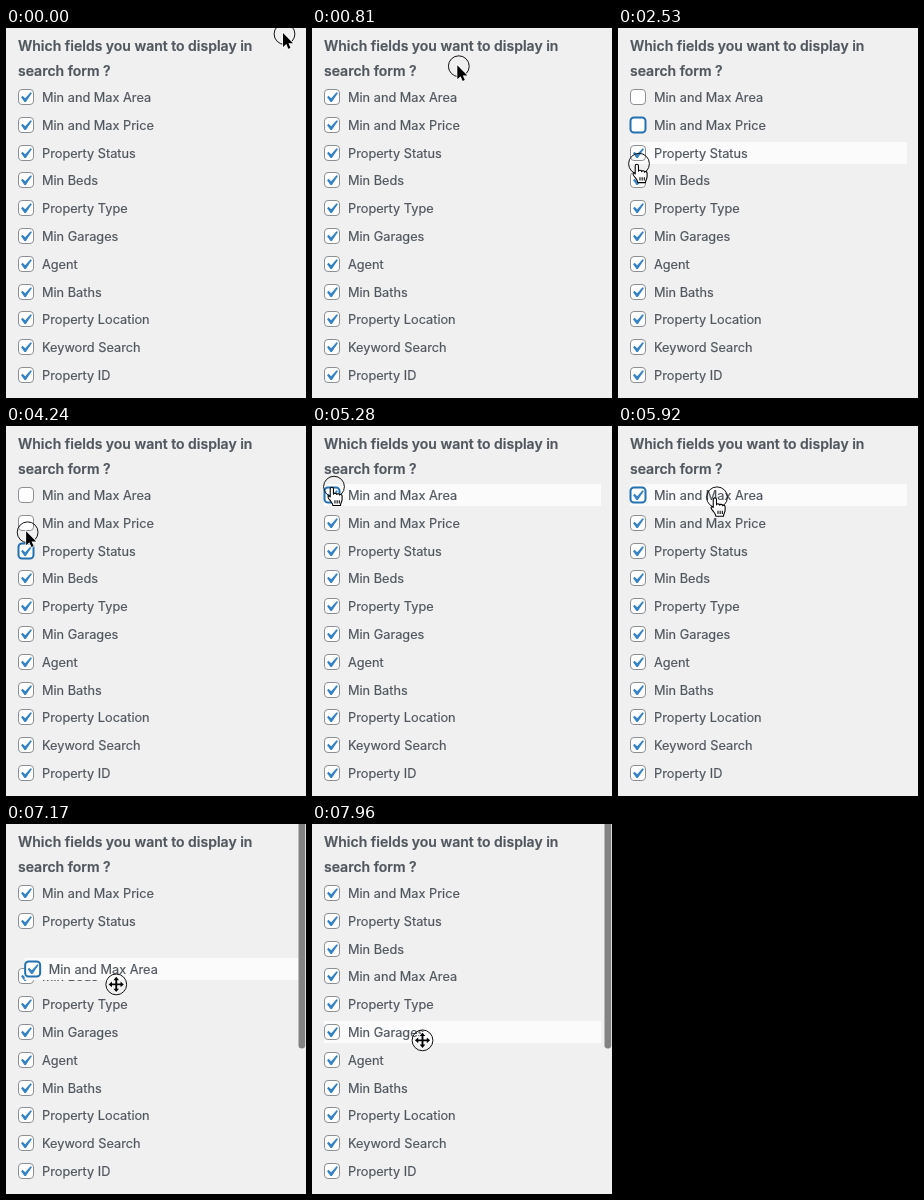
Animation of 300x370 px, one loop 8 s. Source, as an HTML page:

```html
<!DOCTYPE html>
<html lang="en">
<head>
<meta charset="utf-8">
<title>Sortable search fields</title>
<style>
  html, body { margin: 0; width: 100%; height: 100%; overflow: hidden; background: #f0f0f0; }
  svg { display: block; }
  text { font: 12.75px Inter, sans-serif; fill: #50575e; stroke: #50575e; stroke-width: .2; }
  .heading { font-size: 14px; font-weight: 600; }
  .highlight { fill: #fbfbfb; }
  .box { fill: #fff; stroke: #8c8f94; }
  .box.focused { stroke: #2271b1; stroke-width: 2; }
  .tick { fill: #3582c4; }
  .hand { fill: #fff; stroke: #000; stroke-linejoin: round; }
  .arrow, .move { fill: #000; stroke: #fff; stroke-width: 1.4; paint-order: stroke; }
</style>
</head>
<body>
<svg width="300" height="370" viewBox="0 0 300 370">
  <text class="heading" x="12" y="23">Which fields you want to display in</text>
  <text class="heading" x="12" y="48">search form ?</text>
  <g id="rows"></g>
  <rect id="scrollbar" x="292.5" y="-8" width="6.7" height="232.5" rx="3.3" fill="#838383"/>
  <g id="cursor">
    <circle r="10.4" fill="none" stroke="#111"/>
    <path class="arrow" d="M-1.5-1v14l3.3-3 2 4.8 2.2-.9-2-4.7h4.5z"/>
    <path class="hand" transform="scale(1.08)" d="M-3.5 2c0-2 3-2 3 0v5c0-1.3 2.8-1.3 3 .3.3-1.2 2.6-.9 2.7.5.4-1 2.3-.6 2.3 1v3c0 2.5-1.5 3-1.5 5.7h-7c0-2-1.5-3.2-3-5.2-1.2-1.6-2.2-3-1-3.6.8-.4 1.2.3 1.5.8zM.9 12.5v3M2.9 12.5v3M4.9 12.5v3"/>
    <path class="move" transform="scale(.95)" d="M0-8l3 3.5H1V-1h3.5v-2L8 0 4.5 3V1H1v3.5h2L0 8l-3-3.5h2V1h-3.5v2L-8 0l3.5-3v2H-1v-3.5h-2z"/>
  </g>
</svg>
<script>
const LOOP = 8000, DRAG_START = 6430, DROP = 7530;
const DRAG_LAG = 105, HOVER_LAG = 40;
const BOX_X = 21, LABEL_X = 102.5, DROP_X = 111.5;
const labels = ["Min and Max Area", "Min and Max Price", "Property Status", "Min Beds",
  "Property Type", "Min Garages", "Agent", "Min Baths", "Property Location",
  "Keyword Search", "Property ID"];

const rowY = slot => 69 + 27.8 * slot;
const easeOut = u => Math.sin(u * Math.PI / 2);
const easeInOut = u => u * u * (3 - 2 * u);
const linear = u => u;

// Pointer moves: start, end, x, row position, easing
const glides = [
  [410, 1200, BOX_X, 0, easeInOut],
  [1750, 2030, BOX_X, 0.8, easeOut],
  [2260, 2530, BOX_X, 2.4, easeOut],
  [2850, 3210, BOX_X, 1.9, easeOut],
  [3350, 3600, BOX_X, 1.3, easeInOut],
  [3600, 3860, BOX_X, 1.9, easeInOut],
  [4130, 4390, BOX_X + 1, 1, easeOut],
  [4700, 5070, BOX_X + 1, -0.3, easeOut],
  [5300, 6010, LABEL_X, 0.1, easeInOut],
  [DRAG_START, 7290, DROP_X, 3.8, linear],
  [7740, 7960, DROP_X - 1, 5.3, easeOut]];

// Each click toggles the row under the pointer
const clickTimes = [1280, 2260, 3050, 4130, 4650, 5270];

const $ = id => document.getElementById(id);
const show = (el, on) => { el.style.display = on ? "" : "none"; };

$("rows").innerHTML = labels.map(label => `<g>
  <rect class="highlight" x="12" y="-11" width="277" height="22"/>
  <rect class="box" x="12.5" y="-7.5" width="15" height="15" rx="3.5"/>
  <path class="tick" transform="translate(9 -10) scale(1.05)"
    d="M14.83 4.89l1.34.94-5.81 8.38H9.02L5.78 9.67l1.34-1.25 2.57 2.4z"/>
  <text x="36" y="5">${label}</text></g>`).join("");
const rows = [...$("rows").children].map(g => ({
  g, highlight: g.children[0], box: g.children[1], tick: g.children[2] }));
$("rows").append(rows[0].g); // the dragged row stays on top

function pointer(t) {
  let x = 278.5, y = 6;
  for (const [start, end, toX, toRow, ease] of glides) {
    const s = ease(Math.min(1, Math.max(0, (t - start) / (end - start))));
    x += (toX - x) * s;
    y += (rowY(toRow) - y) * s;
  }
  return [x, y];
}

function slotAt([x, y]) {
  const slot = Math.round((y - rowY(0)) / (rowY(1) - rowY(0)));
  return x < 289 && Math.abs(y - rowY(slot)) < 11.2 ? slot : -1;
}

const clickedRows = clickTimes.map(time => slotAt(pointer(time)));

function render(t) {
  const dragging = t >= DRAG_START && t < DROP;
  const [x, y] = pointer(t);
  const hovered = slotAt(pointer(t - HOVER_LAG));

  const grab = pointer(DRAG_START), held = pointer(Math.max(DRAG_START, t - DRAG_LAG));
  const dx = held[0] - grab[0], dy = held[1] - grab[1];
  const gap = t < DRAG_START ? 0 : Math.min(3, Math.floor(dy / (rowY(1) - rowY(0))));

  const clicked = clickedRows.filter((row, i) => t >= clickTimes[i]);
  const focus = t < DROP ? clicked.at(-1) : -1;

  rows.forEach((row, i) => {
    const lifted = dragging && i === 0;
    const slot = i === 0 ? gap : i <= gap ? i - 1 : i;
    const left = lifted ? dx : 0, top = Math.round(lifted ? rowY(0) + dy : rowY(slot));
    row.g.setAttribute("transform", `translate(${left} ${top})`);
    row.box.classList.toggle("focused", focus === i);
    show(row.highlight, dragging ? lifted : slot === hovered);
    show(row.tick, clicked.filter(r => r === i).length % 2 === 0);
  });

  const kind = t >= DRAG_START ? "move" : hovered >= 0 ? "hand" : "arrow";
  for (const shape of $("cursor").querySelectorAll("path"))
    show(shape, shape.classList.contains(kind));
  $("cursor").setAttribute("transform", `translate(${x} ${y})`);
  show($("scrollbar"), t >= DRAG_START);
}

function tick() {
  render(performance.now() % LOOP);
  requestAnimationFrame(tick);
}
tick();
</script>
</body>
</html>
```
